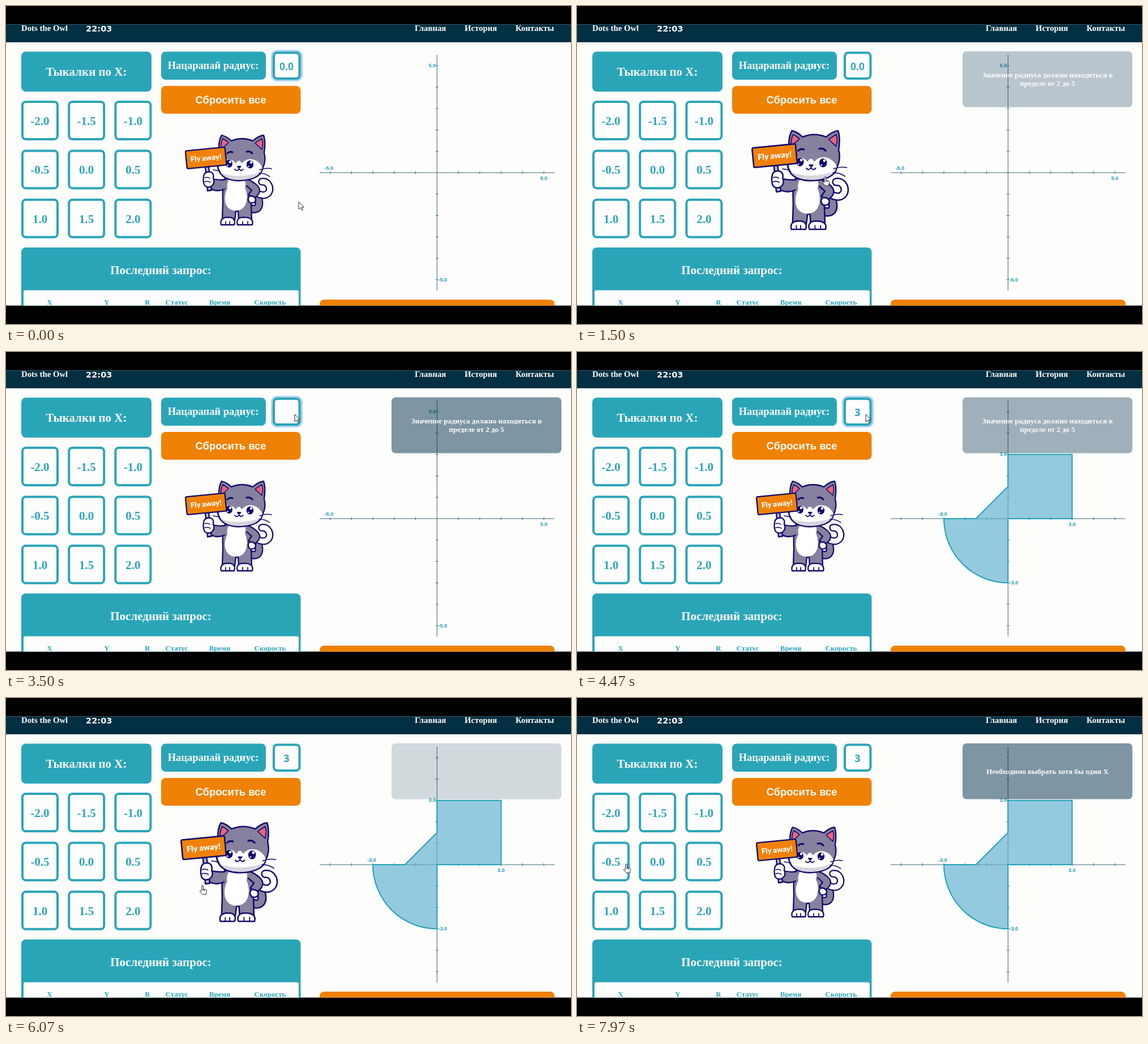
Write an HTML page that moves like this. It is 998 px wide and 561 px high and loops after 8 s.

```html
<!DOCTYPE html>
<html lang="ru">
<head>
<meta charset="utf-8">
<title>Plot page</title>
<style>
  html, body { margin: 0; width: 100%; height: 100%; overflow: hidden; background: #000; }
  svg { display: block; width: 998px; height: 561px; }
  .serif { font-family: "Liberation Serif", serif; font-weight: 700; }
  .sans { font-family: "Liberation Sans", sans-serif; font-weight: 700; }
  .open { font-family: "Open Sans", sans-serif; font-weight: 700; }
  .lato { font-family: Lato, sans-serif; font-weight: 900; }
  .clock { font-family: "DejaVu Sans", sans-serif; font-weight: 700; }
</style>
</head>
<body>
<svg id="stage" viewBox="0 0 998 561">
  <defs>
    <clipPath id="page"><rect y="32.5" width="998" height="496"/></clipPath>
  </defs>
  <rect width="998" height="561"/>
  <g clip-path="url(#page)">
    <rect y="32" width="998" height="497" fill="#fdfdfc"/>
    <rect y="32" width="998" height="32" fill="#032f43"/>
    <g id="panels"></g>
    <g id="axes" stroke="#3d6a74"></g>
    <path id="region" fill="#5fb0d2" fill-opacity=".66" stroke="#20a3b5" stroke-width="2"/>
    <g id="marks"></g>
    <g id="cat" stroke="#110b6b" stroke-width="2.3" stroke-linejoin="round" stroke-linecap="round" fill="none">
      <path d="M430 357Q451 363 446 341" stroke-width="15"/>
      <path d="M430 357Q451 363 446 341" stroke="#85819f" stroke-width="10.5"/>
      <path d="M445 331C459 339 470 328 464 316Q460 309 452 310" stroke-width="13.5"/>
      <path d="M445 331C459 339 470 328 464 316Q460 309 452 310" stroke="#fff" stroke-width="9"/>
      <path d="M387 304C381 318 383 335 383 347L382 378H404L406 362H410L411 378H434L433 348C437 332 435 315 429 304Z" fill="#85819f"/>
      <path d="M395 305Q408 313 421 305Q425 313 422 320C429 335 427 361 406 361C385 361 383 337 391 322Q389 312 395 305Z" fill="#fff" stroke="none"/>
      <path d="M394 305Q408 317 423 305Z" fill="#d6d5de" stroke="none"/>
      <path d="M380 386C377 375 386 372 393 373C401 372 406 378 403 386Z" fill="#fff"/>
      <path d="M409 386C406 378 411 372 420 373C429 372 438 376 435 386Z" fill="#fff"/>
      <path d="M388 380V385M395 380V385M418 380V385M427 380V385" stroke-width="1.7"/>
      <path d="M388 306Q378 308 365 305L361 322Q373 329 386 323" fill="#85819f"/>
      <path d="M427 306C438 310 447 318 448 324C449 331 443 336 438 339L428 333L434 325L425 317" fill="#85819f"/>
      <path d="M430 335Q441 335 441 342Q440 349 431 347Q425 342 430 335Z" fill="#fff"/>
      <path d="M376 258Q375 237 381 228Q390 230 398 238Q417 230 436 238Q446 229 455 228Q459 239 456 259C459 270 457 279 453 287C451 301 432 308 412 308C391 308 379 301 375 288C371 277 373 267 376 258Z" fill="#85819f"/>
      <path d="M380 253Q379 241 383 234Q389 237 393 241Z M452 253Q455 241 452 234Q445 238 440 242Z" fill="#e9647f" stroke-width="1.5"/>
      <path d="M376 285C382 266 400 268 406 278Q411 268 417 278C425 265 447 269 453 286C448 301 431 306.5 412 306.5C393 306.5 381 301 376 285Z" fill="#fff" stroke="none"/>
      <path d="M379 294Q412 306 450 293C442 303 428 306.5 412 306.5C396 306.5 385 302 379 294Z" fill="#d6d5de" stroke="none"/>
      <path d="M391 260Q395 256 400 258M425 257Q431 255 435 260" stroke-width="3"/>
      <g fill="#110b6b" stroke="none">
        <ellipse cx="394" cy="278" rx="6" ry="7"/><ellipse cx="431" cy="279.500" rx="6.200" ry="7"/>
        <path d="M408 282H415.500Q415 286 411.700 286Q408.500 286 408 282Z"/>
      </g>
      <g fill="#fff" stroke="none">
        <circle cx="396" cy="275" r="2.200"/><circle cx="433" cy="276" r="2.200"/>
        <circle cx="391.500" cy="281.500" r="1.200"/><circle cx="428.500" cy="283" r="1.200"/>
      </g>
      <path d="M404 288Q408 293 411.700 287Q415 293 419 288" stroke-width="1.900"/>
      <path d="M448 289Q458 285 469 287M447 295Q458 295 466 301M377 291L366 289" stroke-width="1.500"/>
      <path d="M352 284L358 283.500L363 325L356 326Z" fill="#b7b5cb"/>
      <path d="M350 297Q354 291 362 293Q368 296 366 304Q370 312 363 318Q354 322 350 315Q347 306 350 297Z" fill="#fff"/>
      <path d="M351 303Q356 301 360 304M351 310Q356 308 361 311" stroke-width="1.500"/>
      <g transform="translate(353.200 268) rotate(-5.500)">
        <rect x="-35" y="-15.800" width="70" height="31.600" rx="2.500" fill="#f0810a"/>
        <text class="lato" y="4.500" font-size="13" text-anchor="middle" fill="#fff" stroke="none">Fly away!</text>
      </g>
    </g>
    <g id="toast">
      <rect x="681" y="80" width="300" height="98.500" rx="7" fill="#012e4b"/>
      <g id="note"></g>
    </g>
    <g id="cursor" stroke="#222a35" stroke-width="1" stroke-linejoin="round" fill="#fff">
      <path id="arrow" d="M0 0V13L3 10.300L5.200 14.800L7.300 13.800L5.200 9.500H9.300Z"/>
      <path id="hand" d="M-1.300 9V1A1.300 1.300 0 0 1 1.300 1V6L6 7.200Q7.600 7.700 7.400 9.500L6.200 15.500H0L-4 10.700Q-5 9-3.800 8.500Q-2.800 8.200-1.300 10M3.700 7V9.500M1.300 6V9"/>
      <path id="beam" d="M-3 -7H-1L0 -6L1 -7H3M0 -6V6M-3 7H-1L0 6L1 7H3" fill="none"/>
    </g>
  </g>
</svg>
<script>
const LOOP = 8000, OX = 761.3, OY = 294, UNIT = 37.75;
const TEAL = '#2aa5b8', ORANGE = '#ef8105', CREAM = '#fcfdf6';
const el = id => document.getElementById(id);

const rect = (x, y, w, h, fill, rx = 8, more = '') =>
  `<rect x="${x}" y="${y}" width="${w}" height="${h}" rx="${rx}" fill="${fill}" ${more}/>`;
const text = (s, x, y, size, fill, cls = 'serif', anchor = 'middle') =>
  `<text class="${cls}" x="${x}" y="${y}" font-size="${size}" fill="${fill}" text-anchor="${anchor}">${s}</text>`;
const box = (x, y, w, h) =>
  rect(x + 2, y + 2, w - 4, h - 4, '#fdfdfd', 6, `stroke="${TEAL}" stroke-width="4"`);

function buildPanels() {
  let s = text('Dots the Owl', 27, 44, 14.8, CREAM, 'serif', 'start') +
    text('22:03', 164.3, 45, 14.6, CREAM, 'clock');
  [['Главная', 722], ['История', 810], ['Контакты', 900]].forEach(([name, x]) =>
    s += text(name, x, 44, 14.8, CREAM, 'serif', 'start'));

  s += rect(27, 80.5, 230, 70.5, TEAL) + text('Тыкалки по X:', 142, 123, 21, CREAM);
  for (let i = 0; i < 9; i++) {
    const x = 27 + i % 3 * 82.2, y = 167 + Math.floor(i / 3) * 86.4;
    s += box(x, y, 66, 70) + text((i / 2 - 2).toFixed(1), x + 33, y + 42.7, 21, TEAL);
  }

  s += rect(274, 80.5, 185, 49.5, TEAL) + text('Нацарапай радиус:', 366, 111, 18.5, CREAM);
  s += '<g id="glow">' + rect(468, 77.5, 56, 55.5, '#a9d2ef', 11) + '</g>';
  s += box(471, 80.5, 49.5, 49.5) + '<g id="value"></g>';
  s += rect(274, 141, 246.5, 49, ORANGE) + text('Сбросить все', 397, 171.5, 18.4, CREAM, 'sans');

  s += rect(27, 426, 493.5, 120, TEAL) + rect(31, 501.5, 486, 60, '#fdfdfd', 3) +
    text('Последний запрос:', 273.5, 473, 21, CREAM);
  [['X', 77], ['Y', 178], ['R', 250], ['Статус', 301.5], ['Время', 377.5], ['Скорость', 466.5]]
    .forEach(([name, x]) => s += text(name, x, 527, 13, TEAL));

  s += rect(554, 518, 415, 40, ORANGE);
  el('panels').innerHTML = s;
}

function buildAxes() {
  let d = `M554 ${OY}H969M${OX} 86V502`;
  for (let i = -5; i <= 5; i++) {
    if (!i) continue;
    d += `M${OX + i * UNIT} ${OY - 2.5}v5M${OX - 2.5} ${OY + i * UNIT}h5`;
  }
  el('axes').innerHTML = `<path d="${d}"/>`;
}

function regionPath(r) {
  const a = r * UNIT, h = a / 2;
  return `M${OX - a} ${OY}A${a} ${a} 0 0 0 ${OX} ${OY + a}V${OY}H${OX + a}V${OY - a}H${OX}v${h}l${-h} ${h}Z`;
}

function marks(r) {
  const a = r * UNIT, n = r.toFixed(1);
  const label = (s, x, y, anchor) => text(s, x, y, 9, '#1e9bb0', 'sans', anchor);
  return label(n, OX - 2, OY - a + 2.5, 'end') + label(n, OX + a, OY + 12.5) +
    label('-' + n, OX - a - 2, OY - 5.5) + label('-' + n, OX + 2.5, OY + a + 3, 'start');
}

const clamp = v => Math.max(0, Math.min(1, v));
const smooth = v => v * v * (3 - 2 * v);

// Interpolates one column of [time, ...values] keys.
function track(keys, t, col = 1, ease = v => v) {
  let i = 0;
  while (i < keys.length - 2 && t >= keys[i + 1][0]) i++;
  const [a, b] = [keys[i], keys[i + 1]];
  return a[col] + (b[col] - a[col]) * ease(clamp((t - a[0]) / (b[0] - a[0])));
}
// Last entry whose time has come.
const step = (keys, t) => keys.filter(k => k[0] <= t).pop()[1];

const pointer = [[0, 517, 345.5], [100, 517, 345.5], [560, 431, 322], [1070, 430, 320.5], [1350, 430, 320.5],
  [2150, 519, 118], [2270, 519, 118], [2500, 510, 110], [4950, 510, 110], [5370, 330, 325],
  [5700, 347, 331], [6700, 347, 331], [7900, 87, 293]];
const fade = [[0, 0], [580, 0], [2310, .5], [4020, .5], [5600, .04], [7200, .5]];
const hover = [[0, 0], [400, 0], [700, 1], [1650, 1], [1950, 0], [5370, 0], [5670, 1], [7000, 1], [7300, 0]];
const typed = [[0, '0.0'], [3000, '0.'], [3150, '0'], [3300, ''], [3750, '3']];
const notes = [
  [0, ['Значение радиуса должно находиться в', 'пределе от 2 до 5']],
  [5600, []],
  [6350, ['Необходимо выбрать хотя бы один X']]
];

const inside = (x, y, l, t, r, b) => x > l && x < r && y > t && y < b;
function cursorKind(t, x, y) {
  if (t > 2050 && t < 2420) return 'beam';
  const active = inside(x, y, 308, 216, 480, 398) || inside(x, y, 27, 167, 257, 409) ||
    inside(x, y, 274, 141, 520, 190);
  return active ? 'hand' : 'arrow';
}

const show = (id, on) => el(id).setAttribute('display', on ? 'inline' : 'none');
const fill = (id, html) => { if (el(id).dataset.html !== html) el(id).innerHTML = el(id).dataset.html = html; };

function draw(t) {
  const value = step(typed, t), ready = value === '3';
  show('glow', t < 560 || t > 2700 && t < 5600);
  fill('value', text(value, 495.5, 112.8, 18, TEAL, ready ? 'open' : 'sans'));
  show('region', ready);
  fill('marks', marks(ready ? 3 : 5));

  const k = 1 + .1 * track(hover, t, 1, smooth);
  el('cat').setAttribute('transform', `translate(394 307) scale(${k}) translate(-394 -307)`);

  const lines = step(notes, t);
  fill('note', lines.map((s, i) =>
    text(s, 831, 133.5 + 15 * (i - (lines.length - 1) / 2), 13, '#fff')).join(''));
  el('toast').setAttribute('opacity', track(fade, t));

  const x = track(pointer, t, 1, smooth), y = track(pointer, t, 2, smooth);
  const kind = cursorKind(t, x, y);
  ['arrow', 'hand', 'beam'].forEach(id => show(id, id === kind));
  el('cursor').setAttribute('transform', `translate(${x} ${y})`);
}

buildPanels();
buildAxes();
el('region').setAttribute('d', regionPath(3));
const start = performance.now();
function frame() {
  draw((performance.now() - start) % LOOP);
  requestAnimationFrame(frame);
}
frame();
</script>
</body>
</html>
```
